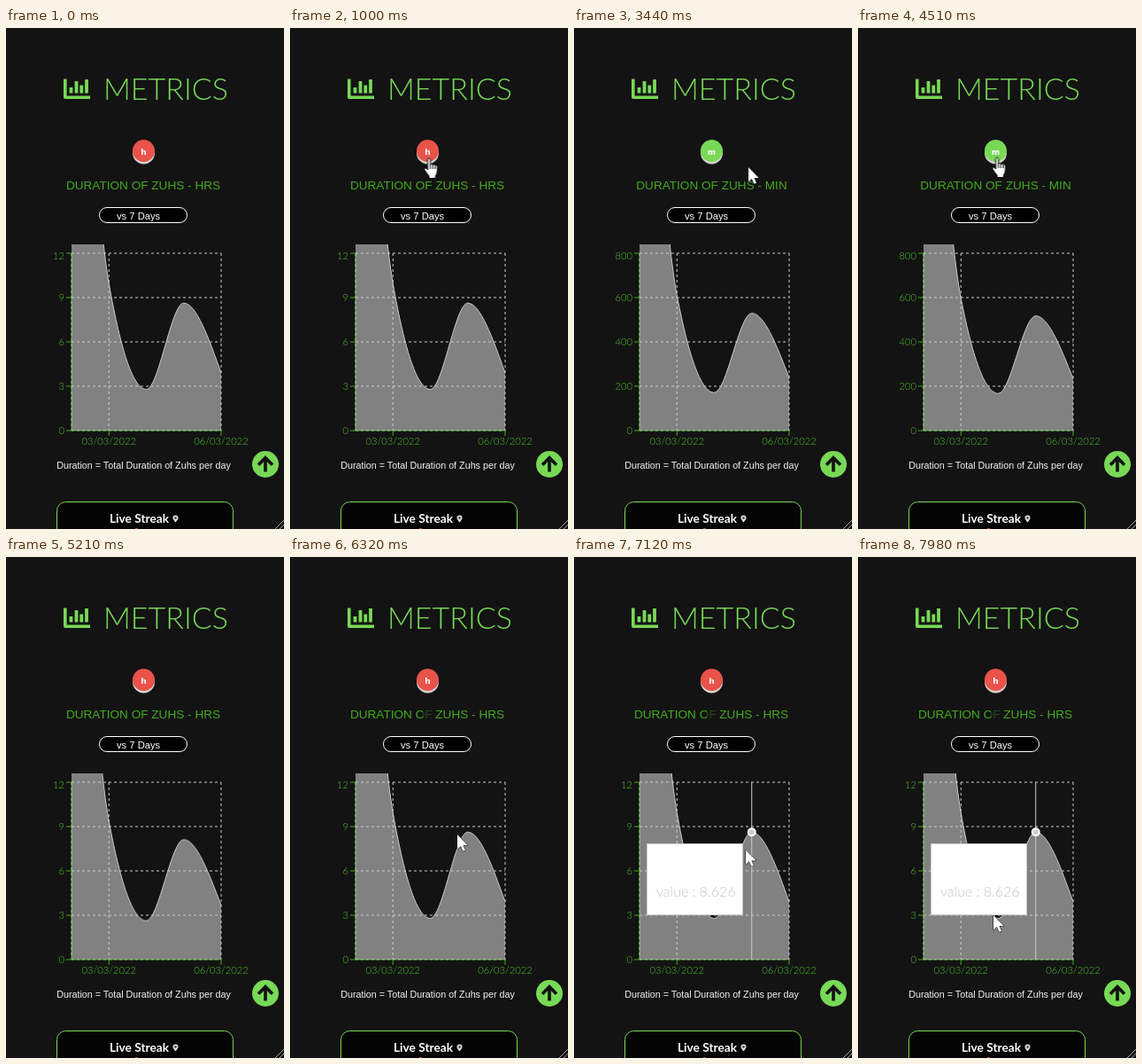
An HTML page that plays this animation: 314x565 px, repeating every 8000 ms.

```html
<!DOCTYPE html>
<html lang="en">
<head>
<meta charset="utf-8">
<title>Metrics</title>
<style>
  html, body { margin: 0; width: 100%; height: 100%; overflow: hidden; background: #131313; }
  svg { display: block; width: 100vw; height: 100vh; }
  text { white-space: pre; }

  .lato { font-family: Lato, sans-serif; }
  .arial { font-family: "Liberation Sans", Arial, sans-serif; }
  .mid { text-anchor: middle; }
  .ticks { font-size: 11.2px; font-weight: 300; fill: #4cc427; }
  .right { text-anchor: end; }
  .heading { font-size: 13.6px; fill: #43ab1f; }
  .unit { font: bold 9px "DejaVu Sans", sans-serif; fill: #fff; }
  .axis { stroke: #43ab1f; fill: none; }
  .grid { stroke: #ccc; fill: none; stroke-dasharray: 3 3; }

  .hours, .minutes, .curve, .pointer, .move, .hand, .arrow, .ripple, .tip, .active, .dim {
    animation: 8s linear infinite;
  }
  .hours { animation-name: hours; animation-timing-function: step-end; }
  .minutes { animation-name: minutes; animation-timing-function: step-end; }
  .curve { animation-name: rescale; transform-origin: 0 454px; }
  .pointer { animation-name: present; animation-timing-function: step-end; }
  .move { animation-name: travel; }
  .hand { animation-name: hand; animation-timing-function: step-end; }
  .arrow { animation-name: arrow; animation-timing-function: step-end; paint-order: stroke; }
  .ripple { animation-name: ripple; }
  .tip { animation-name: slide; }
  .active { animation-name: active; animation-timing-function: step-end; }
  .dim { animation-name: dim; animation-timing-function: step-end; }

  @keyframes hours { 0%, 60% { opacity: 1 } 33.75% { opacity: 0 } 100% { opacity: 1 } }
  @keyframes minutes { 0%, 60% { opacity: 0 } 33.75% { opacity: 1 } 100% { opacity: 0 } }

  @keyframes rescale {
    0% { transform: scaleY(1) }
    33.75% { transform: scaleY(1); animation-timing-function: ease }
    52.5% { transform: scaleY(.9) }
    60.44% { transform: scaleY(.9); animation-timing-function: ease }
    79.19%, 100% { transform: scaleY(1) }
  }

  @keyframes present {
    0%, 63% { opacity: 0 }
    2.125%, 72.25% { opacity: 1 }
    100% { opacity: 1 }
  }
  @keyframes travel {
    0%, 2.12% { transform: translate(256px, 491px); animation-timing-function: ease-in-out }
    12% { transform: translate(156.5px, 147px) }
    13.5%, 36.9% { transform: translate(156.5px, 144px) }
    41.25% { transform: translate(193px, 155px) }
    43% { transform: translate(197px, 157px) }
    45%, 52.25% { transform: translate(199px, 160px); animation-timing-function: ease-in-out }
    56.5%, 63% { transform: translate(156.5px, 145px) }
    72.2% { transform: translate(152px, 150px) }
    73.4% { transform: translate(152px, 162px); animation-timing-function: ease-in-out }
    79%, 80.4% { transform: translate(189px, 313px) }
    83.4% { transform: translate(223px, 250px) }
    84% { transform: translate(219px, 254px) }
    89% { transform: translate(194px, 330px) }
    94%, 97.1% { transform: translate(145px, 406px) }
    99.7%, 100% { transform: translate(153px, 404px) }
  }
  @keyframes hand { 0%, 38.3%, 72.2% { opacity: 0 } 11.6%, 55.5% { opacity: 1 } 100% { opacity: 0 } }
  @keyframes arrow { 0%, 38.3%, 72.2% { opacity: 1 } 11.6%, 55.5% { opacity: 0 } 100% { opacity: 1 } }

  @keyframes ripple {
    0%, 31.8% { transform: scale(1); opacity: 0 }
    31.81% { transform: scale(1); opacity: .55 }
    36.8% { transform: scale(1.95); opacity: 0 }
    58% { transform: scale(1); opacity: 0 }
    58.01% { transform: scale(1); opacity: .55 }
    62.2% { transform: scale(1.95); opacity: 0 }
    79.4% { transform: scale(1); opacity: 0 }
    79.41% { transform: scale(1); opacity: .55 }
    83.3%, 100% { transform: scale(1.95); opacity: 0 }
  }

  @keyframes slide {
    0%, 80% { transform: translate(100px, 323px); animation-timing-function: ease }
    85%, 100% { transform: translate(82px, 323px) }
  }
  @keyframes active { 0% { opacity: 0 } 80%, 100% { opacity: 1 } }
  @keyframes dim { 0% { opacity: 0 } 73.5%, 100% { opacity: .65 } }
</style>
</head>
<body>
<svg viewBox="0 0 314 565" preserveAspectRatio="none">
  <defs>
    <clipPath id="plot"><path d="M70 244H244V456H70Z"/></clipPath>
  </defs>
  <rect width="314" height="565" fill="#131313"/>

  <!-- header -->
  <g fill="none" stroke="#78d957">
    <path d="M66.800 57.500V78.300H95" stroke-width="3.600" stroke-linejoin="round"/>
    <path d="M73.500 67V73.500M79.500 60V73.500M85.300 64.500V73.500M91 58V73.500" stroke-width="3.800"/>
  </g>
  <text class="lato" x="110" y="81" font-size="34" font-weight="300" fill="#78d957">METRICS</text>

  <!-- unit switch -->
  <circle cx="155.500" cy="141" r="12.5" fill="#d6d3d0"/>
  <g class="hours">
    <circle cx="155.500" cy="138.500" r="12.5" fill="#e9534a"/>
    <text class="unit mid" x="155.5" y="143">h</text>
    <text class="arial heading mid" x="155" y="181.7">DURATION OF ZUHS - HRS</text>
  </g>
  <g class="minutes">
    <circle cx="155.500" cy="138.500" r="12.5" fill="#78d957"/>
    <text class="unit mid" x="155.5" y="143">m</text>
    <text class="arial heading mid" x="155.5" y="181.7">DURATION OF ZUHS - MIN</text>
  </g>
  <rect class="dim" x="150" y="170" width="12" height="14" fill="#131313"/>

  <rect x="105.500" y="202.500" width="99" height="17" rx="8.500" fill="#000" stroke="#fff"/>
  <text class="arial" x="125" y="216" font-size="11.2" fill="#fff">vs 7 Days</text>

  <!-- chart -->
  <path class="grid" d="M74 254H243M74 304H243M74 354H243M74 404H243M74 454H243M74 254V454M116.250 254V454M243 254V454"/>
  <path class="axis" d="M74 254V454H243M68 254H74M68 304H74M68 354H74M68 404H74M68 454H74M116.250 454V460M243 454V460"/>
  <g clip-path="url(#plot)">
    <g class="curve">
      <path fill="#ccc" fill-opacity=".6" d="M74-282C88.080-37 102.170 208.300 116.250 288S144.420 407.500 158.500 407.500S186.670 310.200 200.750 310.200S228.920 349.600 243 389V454H74Z"/>
      <path fill="none" stroke="#ccc" vector-effect="non-scaling-stroke" d="M74-282C88.080-37 102.170 208.300 116.250 288S144.420 407.500 158.500 407.500S186.670 310.200 200.750 310.200S228.920 349.600 243 389"/>
    </g>
  </g>
  <g class="lato ticks right">
    <g class="hours">
      <text x="66" y="261">12</text><text x="66" y="308">9</text>
      <text x="66" y="358">6</text><text x="66" y="408">3</text>
    </g>
    <g class="minutes">
      <text x="66" y="261">800</text><text x="66" y="308">600</text>
      <text x="66" y="358">400</text><text x="66" y="408">200</text>
    </g>
    <text x="66" y="458">0</text>
  </g>
  <g class="lato ticks mid">
    <text x="116.25" y="470">03/03/2022</text>
    <text x="243" y="470">06/03/2022</text>
  </g>
  <text class="arial mid" x="155.5" y="497" font-size="10.75" fill="#f4f4f4">Duration = Total Duration of Zuhs per day</text>

  <!-- card -->
  <rect x="57.500" y="534.500" width="199" height="60" rx="10" fill="#040404" stroke="#78d957"/>
  <text class="lato" x="117" y="558" font-size="13.7" font-weight="700" fill="#fff">Live Streak</text>
  <path d="M191.500 557.500Q188.500 554 188.500 552.500A3 3 0 0 1 194.500 552.500Q194.500 554 191.500 557.500Z" fill="#ddd"/>
  <circle cx="191.500" cy="552.500" r="1.200" fill="#333"/>
  <path d="M146 564.500H149" stroke="#b8433c"/>

  <!-- scroll to top -->
  <circle cx="293" cy="492" r="15" fill="#78d957"/>
  <path d="M285 492.700L293 484.700L301 492.700M293 486V500.500" fill="none" stroke="#131313" stroke-width="3.700"/>
  <path d="M304 565L314 555M309 565L314 560" stroke="#a4a8a4"/>

  <!-- tooltip -->
  <g class="active">
    <path d="M200.750 254V454" stroke="#ccc"/>
    <circle cx="200.750" cy="310.200" r="4" fill="#ccc" stroke="#fff" stroke-width="2"/>
    <g class="tip">
      <rect x=".5" y=".5" width="108" height="80" fill="#fff" stroke="#ccc"/>
      <text class="lato" x="11" y="60" font-size="16" font-weight="300" fill="#c4c4c4">value : 8.626</text>
    </g>
  </g>

  <!-- pointer -->
  <g class="pointer">
    <g class="move">
      <g fill="#fff" stroke="#000" stroke-linejoin="round">
        <path class="arrow" d="M0 0V16.500L3.800 13L6.400 18.800L9 17.700L6.500 11.900H11.700Z"/>
        <g class="hand">
          <path transform="translate(-5 1)" d="M4 13V1.500A1.500 1.500 0 0 1 7 1.500V7.500A1.400 1.400 0 0 1 9.800 7.800A1.400 1.400 0 0 1 12.500 8.400A1.400 1.400 0 0 1 15 9.200V14Q15 17 13 19.500V22.500H5.500V20Q3 17 .6 13.200Q-.3 11.400 1.300 11Q2.500 10.800 4 13Z"/>
          <path d="M2 8.500V13M4.800 9V13M7.500 10V13" fill="none"/>
        </g>
      </g>
      <circle class="ripple" cy="1" r="15" fill="#f5e000"/>
    </g>
  </g>
</svg>
</body>
</html>
```
